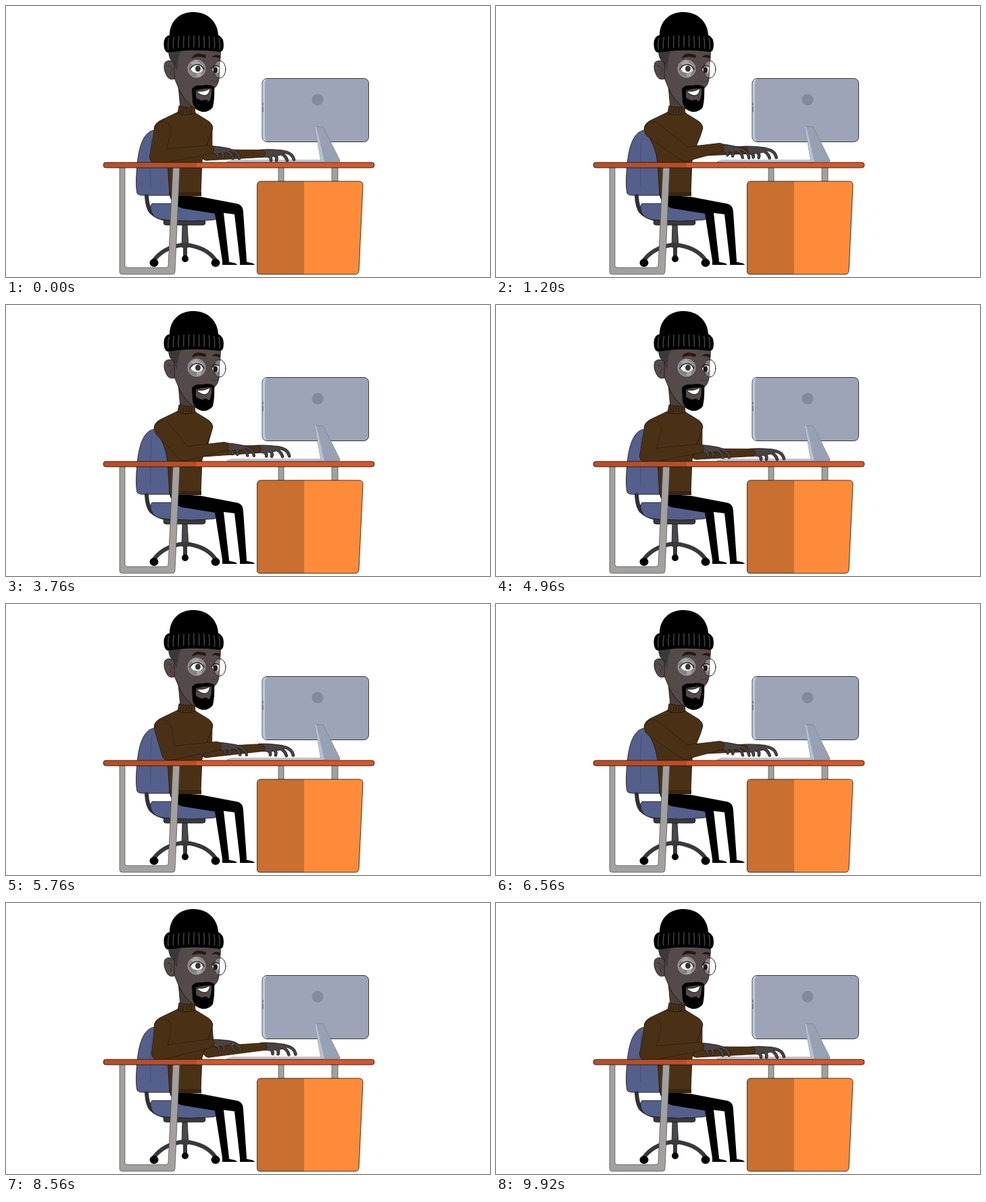
Write an HTML page that moves like this. It is 716 px wide and 402 px high and loops after 10 s.

```html
<!DOCTYPE html>
<html lang="en">
<head>
<meta charset="utf-8">
<title>Typing at the desk</title>
<style>
html, body { margin: 0; width: 100%; height: 100%; overflow: hidden; background: #fff; }
svg { display: block; width: 100vw; height: 100vh; }
.ink { stroke: #15120f; stroke-width: .8; stroke-linejoin: round; }
.knit { fill: #4a3116; }
.sleeve { fill: #4a3116; stroke: #2d1d0b; stroke-width: .8; }
.cloth { fill: #555f8c; }
.skin { fill: #544a49; }
.steel { fill: #a2a1a0; stroke: #4a4a48; stroke-width: .7; }
.line { fill: none; stroke-linecap: round; stroke-linejoin: round; }
</style>
</head>
<body>
<svg viewBox="0 0 716 402" xmlns="http://www.w3.org/2000/svg">
  <defs>
    <g id="hand">
      <g class="line" stroke="#15120f" stroke-width="4.600">
        <path id="fingers" d="M28,-3 Q45,-3 48,9 M26,-1 Q35,1 38,10 M17,1 Q24,4 22,10 M8,3 Q15,5 14,10"/>
      </g>
      <path class="ink" fill="#4a4243" d="M-4,-5.500 C8,-7 22,-6 32,-5 L32,1 C22,4 10,6 -4,5Z"/>
      <use href="#fingers" class="line" stroke="#4a4243" stroke-width="3.400"/>
    </g>
    <clipPath id="face-clip"><path d="M250,62 L318,62 L314,112 L306,140 L250,140Z"/></clipPath>
  </defs>

  <g id="chair">
    <path class="ink cloth" d="M220,184 C205,186 197,204 194,235 Q191,266 194,278 Q196,281 205,281 L244,281 L246,200Z"/>
    <path class="line" stroke="#434c74" d="M215,196 Q213,230 214,266"/>
    <path class="line" stroke="#303036" stroke-width="6" d="M208,282 Q209,299 215,306 Q222,313 238,317"/>
    <path class="ink" fill="#48484d" d="M261,324 H268 L270,358 H260Z"/>
    <path class="line" stroke="#38383d" stroke-width="6" d="M219,377 Q234,357 264,354 Q296,357 310,377 M265,354 V371"/>
    <ellipse cx="219" cy="381" rx="6.500" ry="6"/>
    <ellipse cx="265" cy="375" rx="5" ry="5"/>
    <ellipse cx="310" cy="381" rx="6.500" ry="6"/>
    <rect class="ink" x="233" y="317" width="62" height="8" rx="4" fill="#39393f"/>
    <path class="ink cloth" d="M216,293 Q211,299 217,309 Q220,315 232,317 Q272,321 309,317 Q314,312 308,306 L252,293Z"/>
  </g>

  <g id="legs">
    <path d="M242,280 L288,283 L343,293.500 Q351,296 351,306 L356,378 H346 L338,309 L322,307 L330,378 H320 L309,308 L260,300 Q244,294 242,280Z"/>
    <path d="M320,384 V377 Q328,375 331,380 Q341,381 342,384Z M346,384 V377 Q354,375 357,380 Q367,381 368,384Z"/>
  </g>

  <g id="monitor">
    <rect class="ink" x="379" y="107.500" width="157.500" height="94" rx="7" fill="#9da4b8"/>
    <path fill="#bccae0" d="M386,108 Q379.500,108 379.500,115 V194 Q379.500,201 386,201 Q383,198 383,192 V116 Q383,111 386,108Z"/>
    <path class="line" stroke="#4c5260" d="M380,144 v3 M380,150 v7"/>
    <circle cx="461" cy="139" r="8.500" fill="#838a9b"/>
    <path fill="#98a1b4" stroke="#777f91" stroke-width=".7" d="M457,179 H469 L494,229 Q495,231 491,231 H466Z"/>
    <path fill="#b9c2d2" d="M457,179 H459 L471,231 H466Z"/>
    <path fill="#c6ccda" stroke="#8d93a3" stroke-width=".6" d="M327,231 L334,228.500 H466 L468,232 H327Z"/>
  </g>

  <g id="far"></g>

  <g id="torso">
    <path class="ink knit" d="M255,157 L228,170 Q219,175 219,183 Q236,205 239,232 L242,281 H288 L290,230 L297,206 Q303,193 306,181 Q306,176 300,171 L279,158Z"/>
    <path fill="#38240f" d="M241.500,276 H289 V282 H242Z"/>
  </g>

  <g id="head">
    <path class="ink" fill="#483f3f" d="M255,118 L258,152 H280 V130Z"/>
    <path class="ink knit" d="M256,148 Q268,152 279,149 L280,159 Q266,164 254,159Z"/>
    <path class="line" id="collar" stroke="#2b1b0a"/>
    <path class="ink skin" d="M247,58 L317,58 Q318,76 316,84 L315,108 Q314,117 308,122 L304,152 Q290,158 276,150 Q264,140 257,126 L247,102Z"/>
    <path fill="#3a3838" d="M240,60 H262 L255,76 L253,96 L248,84 Q240,80 240,66Z"/>
    <path class="ink skin" d="M249,84 Q241,78 235,84 Q232,92 237,102 Q241,111 249,108Z"/>
    <path class="line" stroke="#332b2b" d="M239,89 Q245,88 246,96 Q242,97 244,102"/>
    <path fill="#27170f" d="M275,78 Q278,66 296,73 L295,77 Q283,73 275,78Z M304,76 Q310,70 317,74 L316,78 Q310,75 304,76Z"/>
    <g clip-path="url(#face-clip)" fill="#858081">
      <circle cx="282" cy="93" r="13"/>
      <ellipse cx="316" cy="94" rx="9" ry="13"/>
    </g>
    <path fill="#fff" d="M273,94 Q277,87 284,87 Q291,90 291,96 Q285,101 277,98Z M305,94 Q309,87 315,91 L314,99 Q308,101 305,94Z"/>
    <path fill="#fff" opacity=".3" d="M273,85 L281,80 L292,88 L288,104 L282,105 Q284,92 273,85Z"/>
    <ellipse cx="284" cy="93" rx="4" ry="4.500" fill="#3a3232"/>
    <ellipse cx="310" cy="95" rx="3" ry="4.500" fill="#211918"/>
    <path class="line" stroke="#251c1c" stroke-width="1.400" d="M272,94 Q276,86 285,87 Q291,89 293,94 M304,92 Q309,86 315,90"/>
    <g class="line" stroke="#4d4a4e">
      <circle cx="282" cy="93" r="13" stroke="#aaa6a6"/>
      <ellipse cx="316" cy="94" rx="9" ry="13" stroke="#262326"/>
      <path stroke="#53405a" d="M251,87 L269,89 M295,93 Q301,89 307,93"/>
    </g>
    <path class="line" stroke="#3d3434" d="M303,111 Q309,114 313,110"/>
    <path d="M275,123 Q279,117 290,118 Q301,115 308,120 Q309,137 306,150 Q300,158 290,157 Q279,155 276,143Z"/>
    <path class="skin" d="M281,125 Q293,122 304,122 Q305,133 301,141 Q288,142 281,136Z"/>
    <path fill="#fff" stroke="#1a1212" d="M282,126 Q293,128 302,122 Q301,132 294,133 Q286,132 282,126Z"/>
    <path d="M292,139 h6 l-1,8 h-4Z"/>
  </g>

  <g id="hat">
    <path d="M242,46 C241,24 255,9 277.500,9 C299,9 313,24 314,43 Q322,47 322,57 Q322,69 316,68 Q278,63 239,69 Q233,67 233.500,55 Q234,45 242,43Z"/>
    <path class="line" id="ribs" stroke="#444" stroke-width="1.500"/>
  </g>

  <g id="near"></g>

  <g id="desk">
    <path class="steel" fill-rule="evenodd" d="M168,238 H176 V385 Q176,388 179,388 H237 Q240,388 240,385 L247,238 H257 L250,394 Q250,398 246,398 H172 Q168,398 168,394Z"/>
    <path class="steel" d="M403,238 H411 V262 H403Z M482,238 H491 V262 H482Z"/>
    <path fill="#c96f2f" d="M442,260 H377 Q371.500,260 371.500,266 V394 Q371.500,398 376,398 H442Z"/>
    <path fill="#fe8b39" d="M441,260 H522 Q528,260 528,266 L522,393 Q521,398 517,398 H441Z"/>
    <path class="ink" fill="none" d="M377,260 H522 Q528,260 528,266 L522,393 Q521,398 517,398 H376 Q371.500,398 371.500,394 V266 Q371.500,260 377,260Z"/>
    <rect x="144" y="232" width="401" height="8" rx="4" fill="#d4572a"/>
    <path fill="#b94e28" d="M148,232 H282 V240 H148 Q144,240 144,236 Q144,232 148,232Z"/>
    <rect class="ink" x="144" y="232" width="401" height="8" rx="4" fill="none"/>
  </g>
</svg>
<script>
const LOOP = 10000, STEP = 80, BEAT = 4960 / 14;
const $ = id => document.getElementById(id);

// phase, then elbow x y, wrist x y, hand angle: near arm, far arm
const KEYS = [
  [0,    223, 224, 301, 213, 6,  297, 221, 378, 219, 0],
  [.161, 226, 223, 302, 208, 2,  300, 221, 381, 213, 3],
  [.226, 231, 222, 307, 211, 5,  300, 221, 380, 213, 3],
  [.387, 280, 220, 331, 210, 9,  282, 215, 367, 214, 2],
  [.516, 280, 220, 331, 210, 8,  282, 215, 367, 214, 1],
  [.78,  236, 222, 309, 210, 4,  298, 221, 379, 214, 2],
  [1,    223, 224, 301, 213, 6,  297, 221, 378, 219, 0]
];

function pose(p) {
  const i = KEYS.findIndex(k => k[0] > p), a = KEYS[i - 1], b = KEYS[i];
  const u = (p - a[0]) / (b[0] - a[0]);
  return a.map((v, j) => v + (b[j] - v) * u).slice(1);
}

// tapered capsule between two joints
function limb(ax, ay, bx, by, ra, rb) {
  const len = Math.hypot(bx - ax, by - ay);
  const nx = (ay - by) / len, ny = (bx - ax) / len;
  const at = (x, y, r) => `${(x + nx * r).toFixed(2)},${(y + ny * r).toFixed(2)}`;
  return `M${at(ax, ay, ra)} L${at(bx, by, rb)} A${rb},${rb} 0 0 0 ${at(bx, by, -rb)}` +
    ` L${at(ax, ay, -ra)} A${ra},${ra} 0 0 0 ${at(ax, ay, ra)}Z`;
}

function buildArm(id, sx, sy, rs, re, rw, size) {
  $(id).innerHTML = '<use href="#hand"/><path class="sleeve"/><path class="sleeve"/><path class="knit"/>';
  const [hand, upper, fore, seam] = $(id).children;
  return (ex, ey, wx, wy, turn) => {
    hand.setAttribute('transform', `translate(${wx} ${wy}) rotate(${turn}) scale(${size})`);
    upper.setAttribute('d', limb(sx, sy, ex, ey, rs, re));
    fore.setAttribute('d', limb(ex, ey, wx, wy, re, rw));
    seam.setAttribute('d', limb(sx, sy, ex, ey, rs - .5, re - .5));
  };
}

const near = buildArm('near', 232, 184, 12.5, 10.5, 6.5, .94);
const far = buildArm('far', 295, 182, 10, 8, 5.5, 1);

let ribs = '', collar = '';
for (let i = 0; i < 11; i++) {
  const x = 241 + i * 7.4, c = (x - 278) / 38;
  const y = 44 + 4 * c * c;
  ribs += `M${x},${y} Q${x + c * 2},${y + 8} ${x + c},${y + 17 - c * c}`;
}
for (let x = 259; x < 279; x += 4) collar += `M${x},152 l-1,7`;
$('ribs').setAttribute('d', ribs);
$('collar').setAttribute('d', collar);

function draw(ms) {
  const t = Math.floor((ms % LOOP) / STEP) * STEP;
  const p = pose((t / BEAT + 1e-7) % 1);
  near(...p.slice(0, 5));
  far(...p.slice(5));
}

const start = performance.now();
function tick(now) {
  draw(Math.max(0, now - start));
  requestAnimationFrame(tick);
}
draw(0);
requestAnimationFrame(tick);
</script>
</body>
</html>
```
